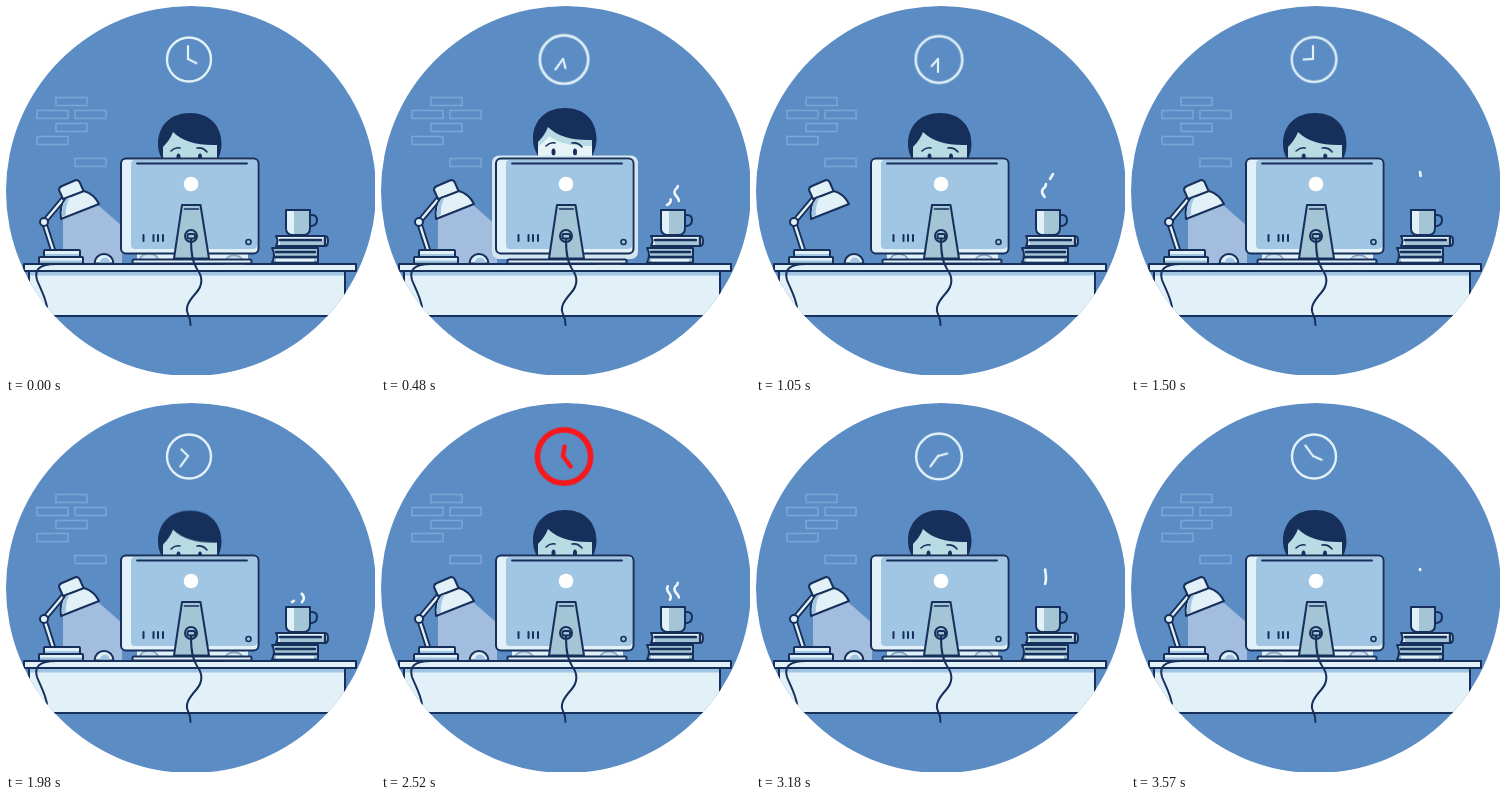
Recreate the animation shown at these times as an HTML page without scripts. Size 369x369 px, loop 3.6 s.

```html
<!DOCTYPE html>
<html lang="en">
<head>
<meta charset="utf-8">
<title>Busy desk</title>
<style>
  :root { --navy: #172f5b; --pale: #e2f1f7; --sky: #a1c6e3; --teal: #a3c5d5; --bg: #5b8cc4; }
  html, body { margin: 0; width: 100%; height: 100%; overflow: hidden; background: #fff; }
  svg { display: block; width: 100%; height: 100%; }

  .line { fill: none; stroke: var(--navy); stroke-width: 2; stroke-linecap: round; stroke-linejoin: round; }
  .pale { fill: var(--pale); }
  .sky { fill: var(--sky); }
  .teal { fill: var(--teal); }
  .navy { fill: var(--navy); }
  .edge { stroke: var(--navy); stroke-width: 2; stroke-linejoin: round; }
  .bricks { fill: none; stroke: #7ba5d4; stroke-width: 1.6; }

  .ring { fill: none; transform-origin: 183px 53.5px; animation: ring 3.6s linear infinite; }
  .hands { animation: alarm 3.6s step-end infinite; }
  .hand { fill: none; stroke-linecap: round; transform-origin: 182px 53px; }
  .minute { animation: turn .3s steps(10) infinite; }
  .hour { animation: turn-hour 3.6s steps(120) infinite; }
  .head { animation: head 3.6s ease-in-out infinite; }
  .features { animation: features 3.6s linear infinite; }
  .eyes { animation: eyes 3.6s step-end infinite; }
  .flash { opacity: 0; animation: flash 3.6s linear infinite; }
  .beam { animation: beam 3.6s step-end infinite; }
  .tap { animation: tap .24s ease-in-out infinite alternate; }
  .tap.late { animation-delay: -.24s; }
  .steam { fill: none; stroke: #eef7fb; stroke-width: 2.6; stroke-linecap: round; }
  .steam-left { stroke-dasharray: 40 300; animation: steam-left 3.6s linear infinite; }
  .steam-right { stroke-dasharray: 48 300; animation: steam-right 3.6s linear infinite; }

  @keyframes turn { to { transform: rotate(360deg); } }
  @keyframes turn-hour { from { transform: rotate(117deg); } to { transform: rotate(477deg); } }
  @keyframes alarm {
    0%, 74.15% { stroke: #e2f1f7; stroke-width: 2.2; }
    66.05% { stroke: #f8181c; stroke-width: 4.4; }
  }
  @keyframes ring {
    0%, 45.8%, 60.8%, 97%, 100% { transform: none; stroke: #e2f1f7; stroke-width: 2.4; }
    13.3% { transform: scale(1.1); }
    29.2% { transform: scale(1.06); }
    66% { transform: scale(1.1); stroke: #e2f1f7; stroke-width: 2.4; }
    66.1% { stroke: #f8181c; stroke-width: 4.6; }
    70% { transform: scale(1.21); stroke: #f8181c; stroke-width: 4.6; }
    74.1% { transform: scale(1.12); stroke: #f8181c; stroke-width: 4.6; }
    74.2% { stroke: #e2f1f7; stroke-width: 2.4; }
    80%, 90% { transform: scale(1.04); stroke: #e2f1f7; stroke-width: 2.4; }
  }
  @keyframes head {
    0%, 8%, 20%, 45%, 65%, 100% { transform: none; }
    12%, 16% { transform: translateY(-5px); }
    55% { transform: translateY(.6px); }
  }
  @keyframes features {
    0%, 25%, 45%, 65%, 74%, 86%, 100% { transform: none; }
    29% { transform: translateX(1px); }
    55% { transform: translateY(.4px); }
    70% { transform: translateY(-1px); }
    77%, 83% { transform: translate(1px, -3px); }
  }
  @keyframes eyes { 0%, 84% { opacity: 1; } 76% { opacity: 0; } }
  @keyframes flash {
    0%, 10%, 19%, 33%, 41%, 74%, 85%, 100% { opacity: 0; }
    12%, 17%, 35%, 39%, 77% { opacity: 1; }
    80% { opacity: .65; }
  }
  @keyframes beam { 0%, 30%, 86.67% { opacity: 1; } 28.33%, 85% { opacity: 0; } }
  @keyframes tap { from { transform: translateY(-.6px); } to { transform: translateY(1.4px); } }
  @keyframes steam-left {
    0%, 11% { stroke-dashoffset: 44; }
    13.33% { stroke-dashoffset: 20; }
    29.17% { stroke-dashoffset: -27; }
    45%, 52% { stroke-dashoffset: -106; }
    52.01% { stroke-dashoffset: 44; }
    55% { stroke-dashoffset: 34; }
    70% { stroke-dashoffset: -10; }
    80% { stroke-dashoffset: -29; }
    99.17% { stroke-dashoffset: -97; }
    100% { stroke-dashoffset: -106; }
  }
  @keyframes steam-right {
    0%, 4% { stroke-dashoffset: 52; }
    13.33% { stroke-dashoffset: -13; }
    29.17% { stroke-dashoffset: -84; }
    32%, 51% { stroke-dashoffset: -106; }
    51.01% { stroke-dashoffset: 52; }
    55% { stroke-dashoffset: 22; }
    70% { stroke-dashoffset: -14; }
    80% { stroke-dashoffset: -77; }
    85%, 100% { stroke-dashoffset: -106; }
  }
</style>
</head>
<body>
<svg viewBox="0 0 369 369">
  <defs>
    <clipPath id="disc"><circle cx="185" cy="185" r="185"/></clipPath>
    <rect id="brick" width="31" height="8"/>
    <path id="palm" d="M-10 4Q-8-4 0-4T10 4Z" fill="#cfe4f0" stroke="#7895b8" stroke-width="1.5"/>
    <path id="arm" d="M38 216L47 244M38 216L59 191"/>
  </defs>

  <g clip-path="url(#disc)">
    <rect width="369" height="369" fill="#5b8cc4"/>

    <g class="bricks">
      <use href="#brick" x="50" y="91.5"/>
      <use href="#brick" x="31" y="104.5"/>
      <use href="#brick" x="69" y="104.5"/>
      <use href="#brick" x="50" y="117.5"/>
      <use href="#brick" x="31" y="130.500"/>
      <use href="#brick" x="69" y="152.5"/>
    </g>

    <!-- clock -->
    <circle class="ring" cx="183" cy="53.5" r="22"/>
    <g class="hands">
      <path class="hand minute" d="M182 53V40"/>
      <path class="hand hour" d="M182 53V43.500"/>
    </g>

    <path class="beam" d="M57 212L92 199L116 220V258H57Z" fill="#a3bddf"/>

    <!-- desk -->
    <path class="pale edge" d="M23 265H339V310H23Z"/>
    <path class="sky" d="M24 266H338V269.5H24Z"/>
    <path class="pale edge" d="M18 258H350V265H18Z"/>

    <!-- lamp -->
    <path class="line" d="M50 258C33 258 28 264 31 274C35 284 39 290 41 301"/>
    <use href="#arm" class="line" style="stroke-width:6"/>
    <use href="#arm" class="line" style="stroke:#e2f1f7;stroke-width:2.4"/>
    <circle class="pale edge" cx="38" cy="216" r="4"/>
    <path class="pale edge" d="M57 193L53 184Q53 181 56 180L70 174Q73 174 74 177L78 186Z"/>
    <path class="pale edge" d="M55 213Q53 199 60 192L78 185Q88 188 93 198Z"/>
    <path class="sky" d="M56 211Q55 200 60 193L64 191Q59 200 60 209Z"/>
    <rect class="pale edge" x="38" y="244" width="36" height="7" rx="1"/>
    <rect class="pale edge" x="33" y="251" width="44" height="6.500" rx="1"/>
    <path class="sky" d="M39 248H73V250H39ZM34 254.500H76V256.500H34Z"/>
    <path class="pale edge" d="M88.500 257.500A9.500 9.500 0 0 1 107.500 257.500Z"/>
    <path class="sky" d="M94 256.500A5 5 0 0 1 104 256.500Z"/>

    <!-- worker -->
    <g class="head">
      <path class="navy" d="M156 160V153C153 148 152 143 152 138C152 119 165 107 184 107S215.500 119 215.500 138C215.500 143 214 149 212 153V160Z"/>
      <path d="M157 160V141Q164 134 167 126Q181 140 211 139V160Z" fill="#b9dce4"/>
      <path class="flash" d="M157 160V145Q164 141 168 135Q182 146 211 145V160Z" fill="#e6f4f8"/>
      <g class="features">
        <path class="line" d="M165 145Q169 141 174 142" style="stroke-width:1.6"/>
        <g class="eyes">
          <path class="line" d="M191 142Q197 141 201 146" style="stroke-width:1.6"/>
          <ellipse class="navy" cx="172.500" cy="151" rx="2" ry="3.500"/>
          <ellipse class="navy" cx="194" cy="151" rx="2" ry="3.500"/>
        </g>
      </g>
    </g>

    <!-- monitor -->
    <path class="pale" d="M131 247H242V254H131Z"/>
    <g transform="translate(143 252)"><use href="#palm" class="tap"/></g>
    <g transform="translate(228 252)"><use href="#palm" class="tap late"/></g>
    <rect class="flash" x="111" y="149.500" width="146" height="103.500" rx="7" fill="#d3e6f2"/>
    <rect class="pale edge" x="126.500" y="253.500" width="119" height="4" rx="1.500"/>
    <rect class="pale edge" x="115" y="152.500" width="137.500" height="95" rx="5"/>
    <path class="sky" d="M129 154H248Q251 154 251 157V239Q251 243 247 243H129Q125 243 125 239V158Q125 154 129 154Z"/>
    <path class="line" d="M131 157.500H241" style="stroke-width:1.8"/>
    <circle cx="185" cy="178" r="7.300" fill="#fff"/>
    <path class="line" d="M137.500 229V235M147.500 229V235M152 229V235M157 229V235"/>
    <circle class="line" cx="242.500" cy="236" r="2.500" style="stroke-width:1.600"/>
    <path class="teal edge" d="M176 199H194.500L203 252.500H168Z"/>
    <path class="line" d="M178.500 203H192.500" style="stroke-width:1.500"/>
    <circle class="teal edge" cx="185" cy="230" r="6"/>
    <rect class="teal line" x="181.500" y="228" width="7.500" height="4.500" rx="1.500"/>
    <path class="line" d="M185 233C185 250 187 257 191 263C197 271 197 279 190 287C182 296 179 302 182 308C184 312 184.500 315 184.500 319"/>

    <!-- books and mug -->
    <path class="pale edge" d="M270 230H319Q322 230 322 235T319 240H270Q273 235 270 230Z"/>
    <path class="teal" d="M274 235H317V239H274Z"/>
    <path class="line" d="M274 234H315M319 232V239" style="stroke-width:2.600"/>
    <path class="teal edge" d="M266 242H312V256.500H266Q270 249 266 242Z"/>
    <path class="line" d="M270 246H309M268 251H311" style="stroke-width:2.400"/>
    <path class="pale" d="M270 253H308V255.500H270Z"/>
    <path class="line" d="M304 209H306Q311 209 311 214T306 220H304"/>
    <path class="teal edge" d="M280 204H304V222Q304 229 297 229H287Q280 229 280 222Z"/>
    <path class="pale" d="M281 205H288V228H287Q281 227 281 222Z"/>

    <g class="steam">
      <path class="steam-left" pathLength="100" d="M286 199C290 197 291 194 288 190C284 185 287 183 289 181C291 177 290 172 289 166"/>
      <path class="steam-right" pathLength="100" d="M296 199C299 196 298 193 296 191C292 187 293 184 296 182C299 178 292 176 294 173L297 168"/>
    </g>
  </g>
</svg>
</body>
</html>
```
